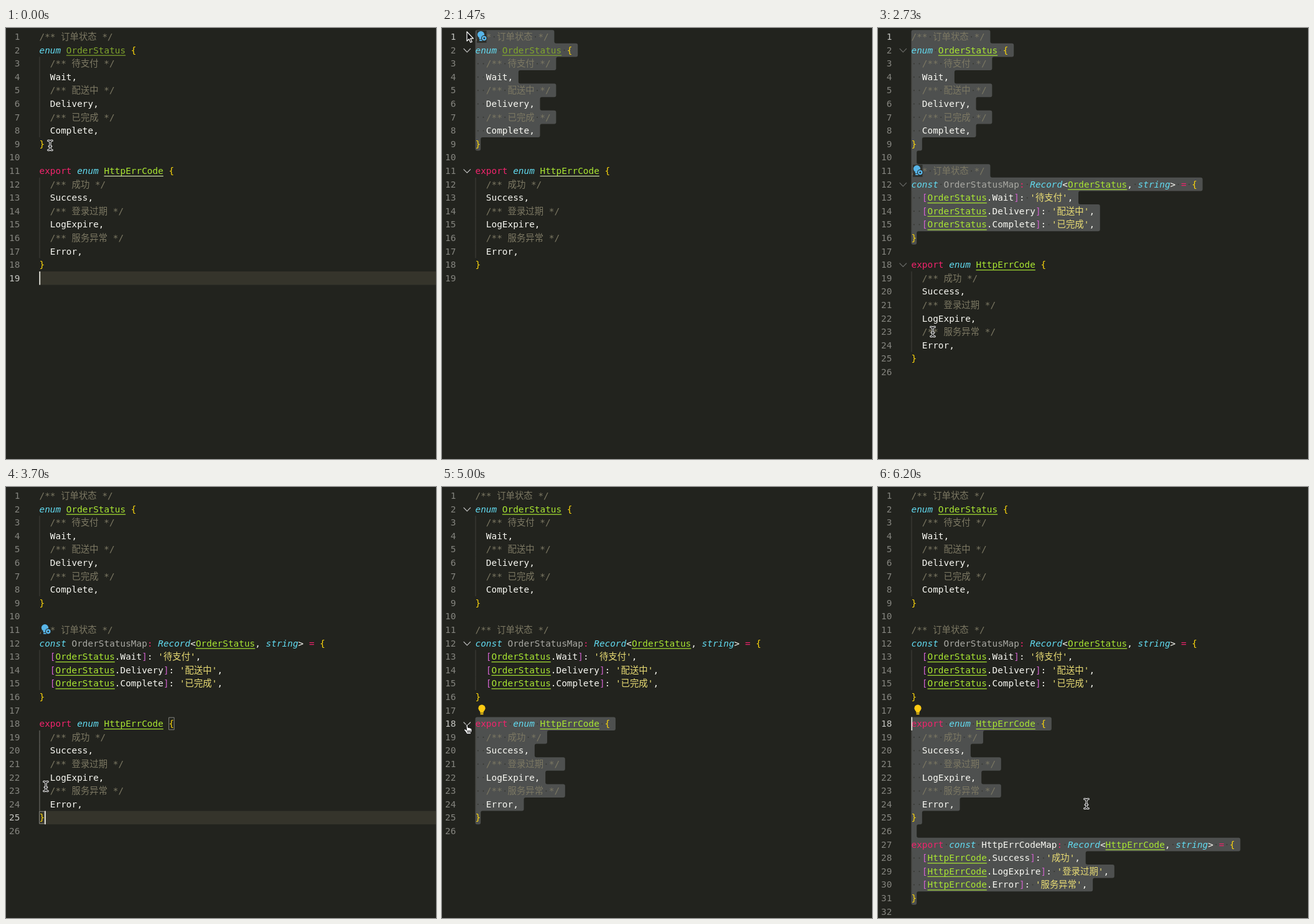
Recreate the animation shown at these times as an HTML page with a canvas. Size 691x694 px, loop 6.23 s.

```html
<!DOCTYPE html>
<html lang="zh-CN">
<head>
<meta charset="utf-8">
<title>Enum map editor</title>
<style>
html, body { margin: 0; width: 100%; height: 100%; overflow: hidden; background: #22231e; }
canvas { display: block; width: 691px; height: 694px; }
</style>
</head>
<body>
<canvas id="c"></canvas>
<script>
const W = 691, H = 694, LOOP = 6230;
const FONT = 14.4, CW = 8.669, LH = 21.6, TOP = 3.2, LEFT = 53.5;
const FACE = `${FONT}px "DejaVu Sans Mono", "Noto Sans CJK SC", "Noto Sans CJK", monospace`;
const C = {
  bg: '#22231e', line: '#35342b', sel: '#4e504f', num: '#85857f', numOn: '#c6c6c2',
  text: '#f8f8f2', note: '#7c7863', key: '#62dcf2', pink: '#f0246c', lime: '#a9e632',
  limeDim: '#80a62d', pale: '#cfe3a6', grey: '#a9a9a3', str: '#e9dc74', brace: '#fcd60c',
  bracket: '#d062cd', guide: '#42433d', guideOn: '#74756f', dot: '#373833',
  blue: '#58b5e8', yellow: '#fdca12'
};

const enumA = ['/** 订单状态 */', 'enum OrderStatus {', '  /** 待支付 */', '  Wait,',
  '  /** 配送中 */', '  Delivery,', '  /** 已完成 */', '  Complete,', '}'];
const mapA = ['', '/** 订单状态 */', 'const OrderStatusMap: Record<OrderStatus, string> = {',
  "  [OrderStatus.Wait]: '待支付',", "  [OrderStatus.Delivery]: '配送中',",
  "  [OrderStatus.Complete]: '已完成',", '}'];
const enumB = ['export enum HttpErrCode {', '  /** 成功 */', '  Success,', '  /** 登录过期 */',
  '  LogExpire,', '  /** 服务异常 */', '  Error,', '}'];
const mapB = ['', 'export const HttpErrCodeMap: Record<HttpErrCode, string> = {',
  "  [HttpErrCode.Success]: '成功',", "  [HttpErrCode.LogExpire]: '登录过期',",
  "  [HttpErrCode.Error]: '服务异常',", '}'];

// Event times in ms
const T = { click1: 80, drag1: 130, end1: 560, bulb1: 800, paste1: 2100,
  click2: 3400, drag2: 3735, end2: 4250, bulb2: 4500, paste2: 5045 };

// Pointer stops: time, x, y
const PATH = [[0, 71, 189], [80, 61, 187], [130, 60, 184], [370, 52, 36], [620, 40, 6],
  [2300, 40, 6], [2700, 88, 489], [2800, 88, 489], [3300, 62, 530], [3560, 62, 530],
  [3700, 64, 482], [4250, 52, 382], [4400, 40, 382], [5090, 40, 382], [5600, 335, 510], [LOOP, 335, 510]];

const cv = document.getElementById('c'), g = cv.getContext('2d');
const dpr = window.devicePixelRatio || 1;
cv.width = W * dpr;
cv.height = H * dpr;

const clamp = v => Math.max(0, Math.min(1, v));
const ramp = (t, a, b) => clamp((t - a) / (b - a));
const yOf = n => TOP + (n - 1) * LH;
const rowAt = y => Math.max(1, Math.floor((y - TOP) / LH) + 1);
const widthOf = s => [...s].reduce((w, ch) => w + (ch > '\u2e80' ? FONT : CW), 0);

function pointer(t) {
  let i = 1;
  while (i < PATH.length - 1 && PATH[i][0] < t) i++;
  const [a, x, y] = PATH[i - 1], [b, x2, y2] = PATH[i];
  const k = ramp(t, a, b), e = k * k * (3 - 2 * k);
  return { x: x + (x2 - x) * e, y: y + (y2 - y) * e };
}

function stateAt(t) {
  const m = pointer(t);
  const s = { m, lines: [...enumA], caret: 19, col: 0, from: 0, to: 0, reset: 0, dim: t < T.paste1 };
  if (t >= T.paste1) s.lines.push(...mapA);
  s.lines.push('', ...enumB);
  if (t >= T.paste2) s.lines.push(...mapB);
  s.lines.push('');
  const select = (row, to, reset) => Object.assign(s, { caret: row, from: row, to, col: 0, reset });
  if (t >= T.paste2) select(18, 31, T.paste2);
  else if (t >= T.end2) select(18, 25, T.end2);
  else if (t >= T.drag2) select(Math.max(18, rowAt(m.y)), 25, t);
  else if (t >= T.click2) Object.assign(s, { caret: 25, col: 1, reset: T.click2 });
  else if (t >= T.paste1) select(1, 16, T.paste1);
  else if (t >= T.end1) select(1, 9, T.end1);
  else if (t >= T.drag1) select(rowAt(m.y), 9, t);
  else if (t >= T.click1) Object.assign(s, { caret: 9, col: 1, reset: T.click1 });
  s.fold = Math.max(ramp(t, 600, 800) * (1 - ramp(t, 2450, 2950)),
    ramp(t, 4270, 4500) * (1 - ramp(t, 5150, 5650)));
  return s;
}

function styleOf(tok, line, dim) {
  if (tok.startsWith('/**')) return [C.note];
  if (tok[0] === "'") return [C.str];
  if (/^(enum|const|Record|string)$/.test(tok)) return [C.key, true];
  if (tok === 'OrderStatus') return [dim ? C.limeDim : C.lime, false, dim ? C.limeDim : C.lime];
  if (tok === 'HttpErrCode') return [C.lime, false, dim ? C.pale : C.lime];
  if (tok === 'OrderStatusMap') return [C.grey];
  if (tok === 'export' || tok === '=') return [C.pink];
  if (tok === ':' && line.includes('Record')) return [C.pink];
  if (tok === '{' || tok === '}') return [C.brace];
  if (tok === '[' || tok === ']') return [C.bracket];
  return [C.text];
}

function drawLine(line, y, dim) {
  let x = LEFT;
  for (const tok of line.match(/\/\*\*.*\*\/|'[^']*'|\w+|\s+|./g) || []) {
    const w = widthOf(tok);
    if (tok.trim()) {
      const [color, italic, under] = styleOf(tok, line, dim);
      g.font = (italic ? 'italic ' : '') + FACE;
      g.fillStyle = color;
      g.fillText(tok, x, y + 15.8);
      if (under) {
        g.fillStyle = under;
        g.fillRect(x, y + 18.7, w, 1.2);
      }
    }
    x += w;
  }
}

function drawSelection(s) {
  const pts = [[LEFT, yOf(s.from)]];
  let last = null;
  for (let n = s.from; n <= s.to; n++) {
    const r = LEFT + widthOf(s.lines[n - 1]) + (n < s.to ? CW : 0);
    if (r !== last) {
      if (last !== null) pts.push([last, yOf(n)]);
      pts.push([r, yOf(n)]);
    }
    last = r;
  }
  pts.push([last, yOf(s.to + 1)], [LEFT, yOf(s.to + 1)]);
  g.beginPath();
  g.moveTo(LEFT, (pts[0][1] + yOf(s.to + 1)) / 2);
  pts.forEach((p, i) => {
    const q = pts[(i + 1) % pts.length];
    g.arcTo(p[0], p[1], q[0], q[1], 3);
  });
  g.closePath();
  g.fillStyle = C.sel;
  g.fill();
}

function drawDots(line, y) {
  let x = LEFT;
  g.fillStyle = C.dot;
  for (const ch of line) {
    const w = widthOf(ch);
    if (ch === ' ') disc(x + w / 2, y + 11, 1);
    x += w;
  }
}

function disc(x, y, r) {
  g.beginPath();
  g.arc(x, y, r, 0, 7);
  g.fill();
}

function trace(pts, close) {
  g.beginPath();
  pts.forEach(([x, y]) => g.lineTo(x, y));
  if (close) g.closePath();
}

function drawGuides(s) {
  s.lines.forEach((line, i) => {
    if (!line.startsWith('  ')) return;
    const on = !s.from && s.caret < 26 && s.lines[s.caret - 1] === '}' && i + 1 < s.caret
      && s.lines.slice(i, s.caret - 1).every(l => l.startsWith('  '));
    g.fillStyle = on ? C.guideOn : C.guide;
    g.fillRect(LEFT, yOf(i + 1), 1, LH);
  });
}

function drawBrackets(s) {
  if (s.from || s.lines[s.caret - 1] !== '}') return;
  let open = s.caret - 1;
  while (!s.lines[open - 1].endsWith('{')) open--;
  g.strokeStyle = '#85857f';
  g.lineWidth = 1;
  const box = (x, n) => g.strokeRect(x + 0.5, yOf(n) + 0.8, CW - 0.5, LH - 2);
  box(LEFT + widthOf(s.lines[open - 1]) - CW, open);
  box(LEFT, s.caret);
}

function drawChevrons(s) {
  if (!s.fold) return;
  g.globalAlpha = s.fold;
  g.strokeStyle = '#c5c5c5';
  g.lineWidth = 1.2;
  s.lines.forEach((line, i) => {
    if (!line.endsWith('{') || i > 25) return;
    const y = yOf(i + 1) + 8.6;
    trace([[35, y], [40.3, y + 5.4], [45.6, y]]);
    g.stroke();
  });
  g.globalAlpha = 1;
}

function drawBulb(row, color, spark) {
  const y = yOf(row), x = spark ? 62.5 : 64;
  g.globalAlpha = 0.7;
  g.fillStyle = C.bg;
  if (spark) g.fillRect(56, y + 1, 15.5, LH - 2);
  g.globalAlpha = 1;
  g.fillStyle = color;
  disc(x, y + 7.4, 5.6);
  g.fillRect(x - 2.8, y + 11, 5.6, 3.8);
  g.fillRect(x - 2.4, y + 15.6, 4.8, 2);
  if (!spark) return;
  g.fillStyle = C.bg;
  disc(67.8, y + 13.4, 4.8);
  g.fillStyle = color;
  disc(67.8, y + 13.4, 3.8);
  g.fillStyle = C.bg;
  disc(67.8, y + 13.4, 1.3);
}

function drawBeam(x, y) {
  for (const [w, color] of [[3.2, '#fff'], [1.2, '#111']]) {
    g.strokeStyle = color;
    g.lineWidth = w;
    g.beginPath();
    for (const d of [-1, 1]) {
      g.moveTo(x - 3.2, y + d * 7.6);
      g.quadraticCurveTo(x, y + d * 7.6, x, y + d * 5);
      g.quadraticCurveTo(x, y + d * 7.6, x + 3.2, y + d * 7.6);
    }
    g.moveTo(x, y - 6);
    g.lineTo(x, y + 6);
    g.moveTo(x - 1.8, y + 1.5);
    g.lineTo(x + 1.8, y + 1.5);
    g.stroke();
  }
}

function drawArrow(x, y) {
  trace([[0, 0], [0, 15], [3.4, 11.8], [5.8, 17.2], [8.2, 16.2], [5.8, 10.9], [10.4, 10.9]]
    .map(([a, b]) => [x + a, y + b]), true);
  g.fillStyle = '#111';
  g.strokeStyle = '#fff';
  g.lineWidth = 1.2;
  g.fill();
  g.stroke();
}

function drawHand(x, y) {
  trace([[-1.4, 0.6], [0.2, 0], [1.4, 1], [1.8, 5.4], [4, 5.6], [6, 6.4], [7.8, 7.6], [8, 11],
    [6.6, 13.4], [6.4, 15.8], [-0.4, 15.8], [-1, 13.8], [-4.4, 9.4], [-4, 7.8], [-2.4, 8], [-0.8, 9.6]]
    .map(([a, b]) => [x + a, y + b]), true);
  g.fillStyle = '#fff';
  g.strokeStyle = '#111';
  g.lineWidth = 1;
  g.fill();
  g.stroke();
  for (const a of [1.4, 3.4, 5.4]) {
    trace([[x + a, y + 10], [x + a, y + 13.4]]);
    g.stroke();
  }
}

function drawPointer(t, s) {
  const { x, y } = s.m;
  if (x >= 49) return drawBeam(x, y);
  const line = s.lines[rowAt(y) - 1] || '';
  (line.endsWith('{') ? drawHand : drawArrow)(x, y);
}

function draw(t) {
  const s = stateAt(t);
  g.setTransform(dpr, 0, 0, dpr, 0, 0);
  g.lineJoin = g.lineCap = 'round';
  g.fillStyle = C.bg;
  g.fillRect(0, 0, W, H);

  if (s.from) drawSelection(s);
  else {
    g.fillStyle = C.line;
    g.fillRect(LEFT, yOf(s.caret), W, LH);
  }
  drawGuides(s);
  s.lines.forEach((line, i) => {
    const n = i + 1, y = yOf(n);
    if (s.from && n >= s.from && n <= s.to) drawDots(line, y);
    drawLine(line, y, s.dim);
    g.font = FACE;
    g.fillStyle = n === s.caret ? C.numOn : C.num;
    g.textAlign = 'right';
    g.fillText(n, 22.4, y + 15.8);
    g.textAlign = 'left';
  });
  drawBrackets(s);
  drawChevrons(s);

  if (t >= T.bulb2) drawBulb(17, C.yellow, false);
  else if (t >= T.bulb1 && t < T.drag2 + 60) drawBulb(t < T.paste1 ? 1 : 11, C.blue, true);

  if (Math.floor((t - s.reset) / 500) % 2 === 0) {
    g.fillStyle = '#f8f8f0';
    g.fillRect(LEFT + s.col * CW, yOf(s.caret), 1.6, LH);
  }
  drawPointer(t, s);
}

const start = performance.now();
function tick() {
  draw((performance.now() - start) % LOOP);
  requestAnimationFrame(tick);
}
tick();
</script>
</body>
</html>
```
